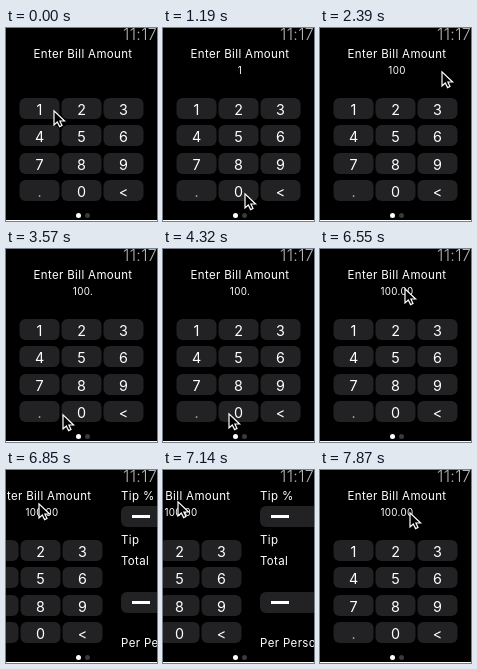
These frames come from a looping animation (151 by 193 pixels, 8 s). An HTML page:

```html
<!DOCTYPE html>
<html lang="en">
<head>
<meta charset="utf-8">
<title>Tip calculator</title>
<style>
  html, body { margin: 0; height: 100%; overflow: hidden; background: #000; }
  svg { display: block; width: 151px; height: 193px; font: 11.5px Inter, Roboto, sans-serif; letter-spacing: .35px; fill: #fff; }
  .mid { text-anchor: middle; }
  .key { fill: #222224; }
</style>
</head>
<body>
<svg viewBox="0 0 151 193">
  <text x="117" y="12" font-size="16" font-weight="300" fill="#b4b4b8">11:17</text>
  <g id="pages">
    <text class="mid" x="77" y="30">Enter Bill Amount</text>
    <text class="mid" id="amount" x="77" y="46" font-size="9.8"></text>
    <g id="keys" class="mid" font-size="14.3" letter-spacing="0"></g>
    <g id="results" transform="translate(151 0)">
      <text x="5" y="30">Tip %</text>
      <text x="5" y="74">Tip</text>
      <text x="5" y="95">Total</text>
      <text x="5" y="177">Per Person</text>
    </g>
  </g>
  <circle cx="72.5" cy="187.5" r="2.5"/>
  <circle cx="81.5" cy="187.5" r="2.5" fill="#3a3a3c"/>
  <rect y="192" width="151" height="1"/>
  <path id="cursor" d="M0 .8V15L3.3 12 5.6 16.6 8 15.5 5.9 11H10.6Z" fill="#000" stroke="#fff" stroke-width="1.2"/>
</svg>
<script>
const LOOP = 8000, STEP = 148.6;
const $ = id => document.getElementById(id);

// Cursor moves, in steps: [from, to, x, y]
const moves = [
  [0, 1, 41, 81], [2, 6, 82, 165], [13, 16, 122, 43], [16, 20, 27, 176], [20, 24, 57, 165], [24, 29, 66, 164],
  [33, 37, 105, 34], [37, 41, 85, 39], [44, 47, 15, 31], [48, 51, 98, 42], [52, 53, 90, 42]
];
const typed = [3, 10, 12, 22, 31, 34];
const dragStart = 44, dragEnd = 51, grabX = 74;

const button = (x, y, width) => `<rect class="key" x="${x}" y="${y}" width="${width}" height="21" rx="6"/>`;

$('keys').innerHTML = ['1', '2', '3', '4', '5', '6', '7', '8', '9', '.', '0', '&lt;'].map((label, i) => {
  const x = 13.5 + i % 3 * 42, y = Math.round(70 + Math.floor(i / 3) * 27.3);
  const fill = label === '.' ? '#aaa' : '#fff';
  return button(x, y, 40) + `<text x="${x + 20}" y="${y + 16.5}" fill="${fill}">${label}</text>`;
}).join('');

$('results').innerHTML += [36, 122].map(y =>
  button(5, y, 141) + `<rect x="16" y="${y + 9}" width="18" height="3"/>`).join('');

const ease = k => k * k * (3 - 2 * k);

function cursorAt(step) {
  let x = 48, y = 82;
  for (const [from, to, toX, toY] of moves) {
    const k = ease(Math.min(1, Math.max(0, (step - from) / (to - from))));
    x += (toX - x) * k;
    y += (toY - y) * k;
  }
  return [Math.round(x), Math.round(y)];
}

function draw(now) {
  const step = Math.floor((now % LOOP + 10) / STEP);
  const [x, y] = cursorAt(step);
  const dragging = step >= dragStart && step <= dragEnd;
  const shift = dragging ? Math.max(0, grabX - x) : 0;
  $('cursor').setAttribute('transform', `translate(${x} ${y})`);
  $('pages').setAttribute('transform', `translate(${-shift} 0)`);
  $('amount').textContent = '100.00'.slice(0, typed.filter(s => s <= step).length);
}

const start = performance.now();
function tick() {
  draw(performance.now() - start);
  requestAnimationFrame(tick);
}
tick();
</script>
</body>
</html>
```
